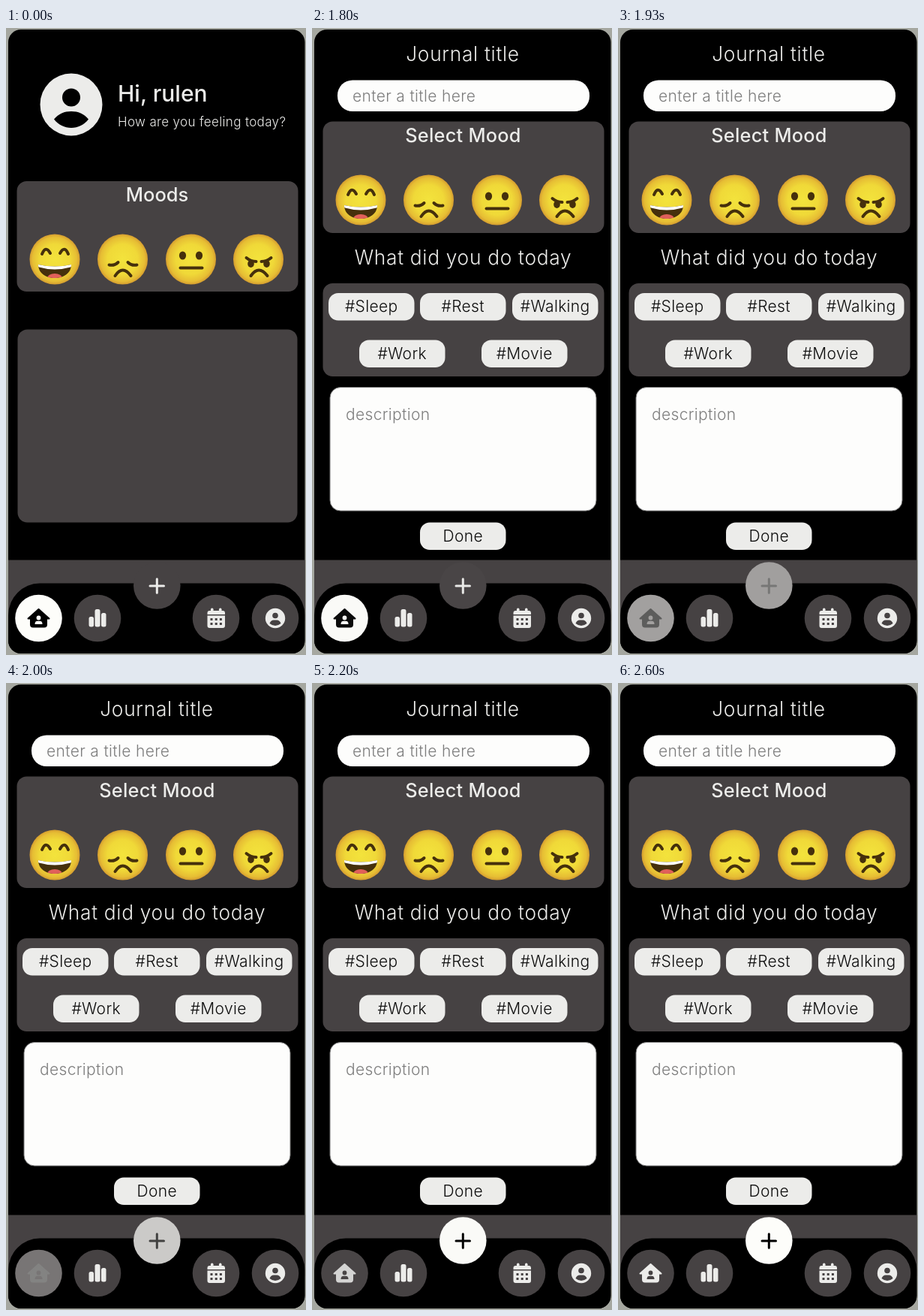
Write an HTML page that moves like this. It is 400 by 835 pixels and loops after 5190 ms.

```html
<!DOCTYPE html>
<html lang="en">
<head>
<meta charset="utf-8">
<title>Mood journal</title>
<style>
html, body { margin: 0; width: 100%; height: 100%; overflow: hidden; background: #a5a7a0; }
svg { display: block; width: 100%; height: 100%; }
text { font-family: Inter, Roboto, sans-serif; fill: #ececea; }
.mid { text-anchor: middle; }
.light { font-weight: 300; }
.h { font-size: 26.3px; font-weight: 300; letter-spacing: .7px; }
.tag { font-size: 21px; font-weight: 350; letter-spacing: .35px; fill: #0c0c0c; text-anchor: middle; }
.hint { font-size: 21px; font-weight: 300; letter-spacing: .35px; fill: #7d7d7d; }
.panel { fill: #464243; }
.pale { fill: #ececea; }
.field { fill: #fdfdfc; }
.ink { fill: none; stroke: #45300c; stroke-width: 4; stroke-linecap: round; }
.dot { fill: #45300c; }
</style>
</head>
<body>
<svg viewBox="0 0 400 835" preserveAspectRatio="none">
  <defs>
    <radialGradient id="skin">
      <stop offset="0" stop-color="#f3e33c"/>
      <stop offset=".6" stop-color="#f0d938"/>
      <stop offset=".88" stop-color="#e6bd34"/>
      <stop offset="1" stop-color="#d59d30"/>
    </radialGradient>
    <clipPath id="screen"><rect x="3" y="2" width="395.5" height="831" rx="17"/></clipPath>
    <clipPath id="mouth"><path d="M-22 7Q0 12 22 7C22 19 11 25 0 25S-22 19-22 7Z"/></clipPath>
    <circle id="face" r="33.5" fill="url(#skin)"/>
    <g id="moods">
      <g transform="translate(65 0)">
        <use href="#face"/>
        <path class="ink" d="M-17-7Q-12-19-6-8M7-8Q13-19 18-7"/>
        <g clip-path="url(#mouth)">
          <rect class="dot" x="-23" y="4" width="46" height="23"/>
          <ellipse cy="25" rx="10" ry="6" fill="#e0605a"/>
          <path d="M-23 4H23V10Q0 17-23 10Z" fill="#fff"/>
        </g>
      </g>
      <g transform="translate(155.5 0)">
        <use href="#face"/>
        <path class="ink" d="M-18 7.500Q-11 9-6 4M19 7.500Q12 9 7 4M-10 22Q0 7 11 22"/>
      </g>
      <g transform="translate(246.5 0)">
        <use href="#face"/>
        <ellipse class="dot" cx="-11" cy="-5" rx="4.6" ry="5.6"/>
        <ellipse class="dot" cx="11" cy="-5" rx="4.6" ry="5.6"/>
        <path class="ink" d="M-14 11.5H15"/>
      </g>
      <g transform="translate(336.5 0)">
        <use href="#face"/>
        <ellipse class="dot" cx="-10" cy="6" rx="4.3" ry="5"/>
        <ellipse class="dot" cx="11" cy="6" rx="4.3" ry="5"/>
        <path class="ink" d="M-16-2Q-10 3-3 3M17-2Q11 3 4 3M-10 22Q.5 7 12 22"/>
      </g>
    </g>
  </defs>

  <g clip-path="url(#screen)">
    <rect width="400" height="835"/>

    <g id="home">
      <circle class="pale" cx="87" cy="102" r="41.5"/>
      <circle cx="87" cy="92.5" r="12"/>
      <path d="M64 121.500C70 114 78 111 87 111S104 114 110 121.500C104 129 96 133 87 133S70 129 64 121.500Z"/>
      <text x="149" y="98" font-size="30" font-weight="500">Hi, rulen</text>
      <text class="light" x="149" y="131" font-size="17" letter-spacing=".35">How are you feeling today?</text>
      <rect class="panel" x="14.5" y="204" width="375" height="147" rx="13"/>
      <text class="mid" x="201.5" y="231" font-size="25.5" font-weight="450">Moods</text>
      <use href="#moods" y="308"/>
      <rect class="panel" x="15.5" y="401.5" width="373" height="257" rx="13"/>
    </g>

    <g id="entry">
      <text class="h mid" x="201" y="44">Journal title</text>
      <rect class="field" x="34" y="69.5" width="336" height="41.5" rx="20"/>
      <text class="hint" x="54" y="98">enter a title here</text>
      <rect class="panel" x="14.5" y="124.5" width="375" height="148.5" rx="13"/>
      <text class="mid" x="201.5" y="152" font-size="25.3" font-weight="500" letter-spacing=".25">Select Mood</text>
      <use href="#moods" y="229"/>
      <text class="h mid" x="201.5" y="315">What did you do today</text>
      <rect class="panel" x="14.5" y="340" width="375" height="124" rx="13"/>
      <g id="tags"></g>
      <rect class="field" x="24" y="478.5" width="355" height="164.5" rx="14" stroke="#767676"/>
      <text class="hint" x="45" y="522">description</text>
    </g>

    <path class="panel" d="M0 708.5H400V790H0Z"/>
    <path d="M3 840V782A42 43 0 0 1 45 739.5H356A42 43 0 0 1 398.5 782V840Z"/>

    <g id="nav">
      <circle class="panel" cx="122" cy="786" r="31.3"/>
      <circle class="panel" cx="280" cy="786" r="31.3"/>
      <circle class="panel" cx="359" cy="786" r="31.3"/>
      <g class="pale">
        <rect x="110.5" y="784" width="6.5" height="13.5" rx="2.5"/>
        <rect x="118.5" y="774" width="7" height="23.5" rx="2.5"/>
        <rect x="127" y="779" width="6.5" height="18.5" rx="2.5"/>
        <rect x="273" y="772.5" width="3.5" height="7" rx="1.7"/>
        <rect x="284" y="772.5" width="3.5" height="7" rx="1.7"/>
        <path d="M268.5 781V779Q268.5 776 271.5 776H289Q292 776 292 779V781Z"/>
        <path d="M268.5 782.5H292V796Q292 799 289 799H271.5Q268.5 799 268.5 796Z"/>
        <circle cx="359" cy="786" r="13.2"/>
      </g>
      <path d="M272.5 787.5h15.5M272.5 793.5h15.5" fill="none" stroke="#464243" stroke-width="3" stroke-dasharray="3 3.2"/>
      <circle class="panel" cx="359" cy="782.5" r="3.8"/>
      <path class="panel" d="M351.5 793Q353 788.5 357 788.5H361Q365 788.5 366.5 793Q363 796 359 796T351.5 793Z"/>

      <circle id="homeDisc" cx="43.5" cy="786" r="31.3"/>
      <path id="homeIcon" stroke-width="2" stroke-linejoin="round" d="M43.5 774L57.5 786.5H54V794.5Q54 797.5 51 797.5H36Q33 797.5 33 794.5V786.5H29.5Z"/>
      <g id="homeUser">
        <circle cx="43.5" cy="785.5" r="2.9"/>
        <path d="M38.5 794Q38.5 789.8 42 789.8H45Q48.5 789.8 48.5 794Z"/>
      </g>
      <circle id="plusDisc" cx="201.3" cy="742.5" r="31.3"/>
      <path id="plusIcon" fill="none" stroke-width="3" stroke-linecap="round" d="M192 743H210.5M201.3 733.7V752.3"/>
    </g>
  </g>
</svg>
<script>
const LOOP = 5190, SWITCH = 1800, FADE_AT = 1785, FADE = 500, ICON_FADE = 545;
const IDLE = [70, 66, 67], LIT = [253, 253, 250], PALE = [236, 236, 234], BLACK = [0, 0, 0];
const $ = id => document.getElementById(id);
const clamp = v => Math.min(1, Math.max(0, v));
const mix = (a, b, k) => `rgb(${a.map((v, i) => Math.round(v + (b[i] - v) * k)).join()})`;

const tags = [[22, 353, "#Sleep"], [144, 353, "#Rest"], [267, 353, "#Walking"],
  [63, 415.5, "#Work"], [226, 415.5, "#Movie"], [144, 658.5, "Done"]];
$("tags").innerHTML = tags.map(([x, y, s]) =>
  `<rect class="pale" x="${x}" y="${y}" width="114.5" height="36.5" rx="13"/>
   <text class="tag" x="${x + 57.2}" y="${y + 25}">${s}</text>`).join("");

// cubic-bezier(.25, .1, .25, 1)
function ease(x) {
  if (x <= 0 || x >= 1) return clamp(x);
  const curve = (u, a, b) => 3 * u * (1 - u) ** 2 * a + 3 * u * u * (1 - u) * b + u ** 3;
  let lo = 0, hi = 1;
  for (let i = 0; i < 24; i++) {
    const u = (lo + hi) / 2;
    if (curve(u, .25, .25) < x) lo = u; else hi = u;
  }
  return curve(lo, .1, 1);
}

function draw(t) {
  const entry = t >= SWITCH, dt = entry ? t - FADE_AT : 0;
  const p = ease(dt / FADE);
  const lag = 1 - (1 - clamp(dt / ICON_FADE)) ** 1.6;
  $("home").style.display = entry ? "none" : "";
  $("entry").style.display = entry ? "" : "none";
  $("plusDisc").setAttribute("fill", mix(IDLE, LIT, p));
  $("plusIcon").setAttribute("stroke", mix(PALE, BLACK, p));
  const homeFill = mix(LIT, IDLE, p), icon = mix(BLACK, PALE, lag);
  $("homeDisc").setAttribute("fill", homeFill);
  $("homeUser").setAttribute("fill", homeFill);
  $("homeIcon").setAttribute("fill", icon);
  $("homeIcon").setAttribute("stroke", icon);
}

const start = performance.now();
function tick() {
  draw((performance.now() - start) % LOOP);
  requestAnimationFrame(tick);
}
tick();
</script>
</body>
</html>
```
